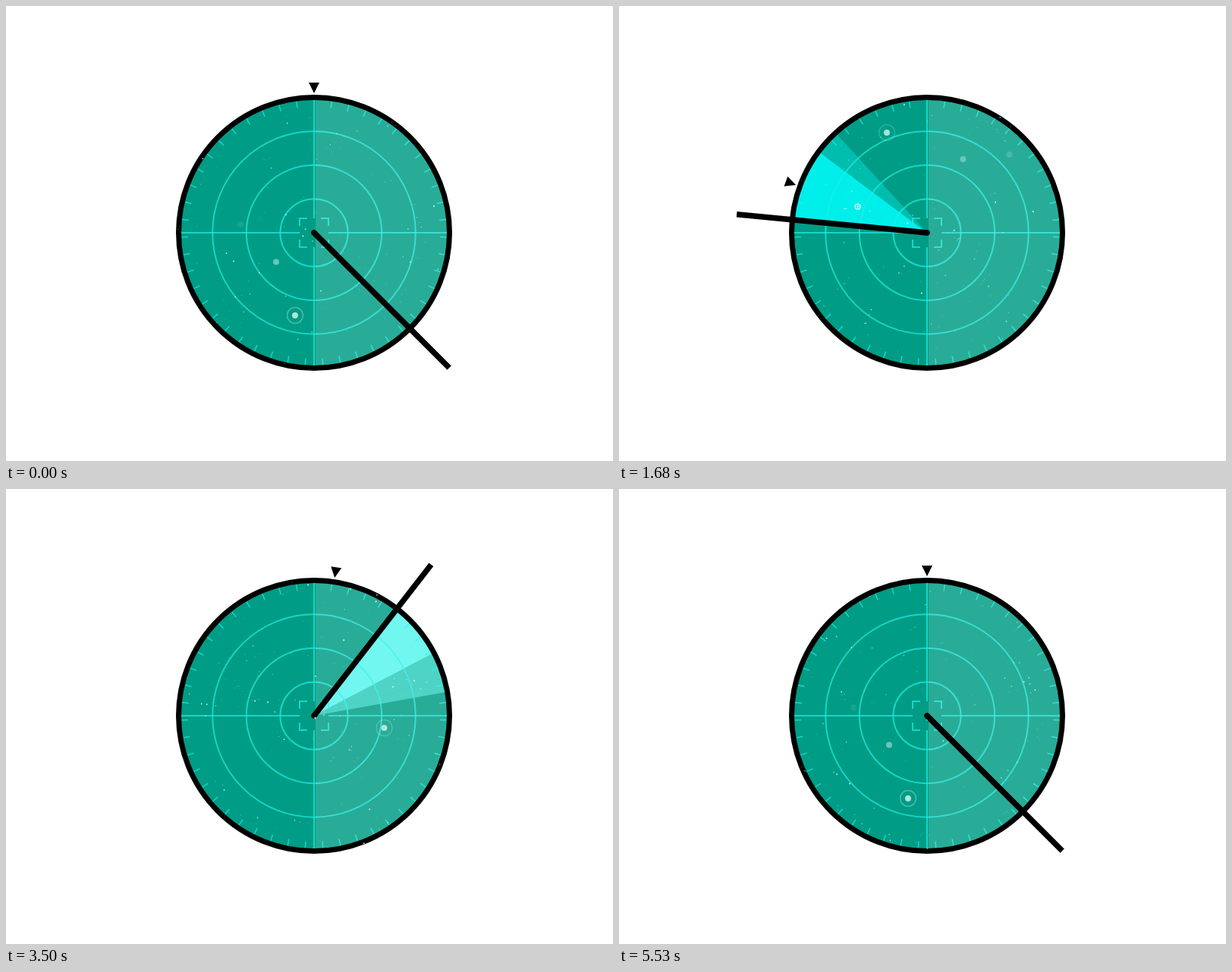
Animation of 800 by 600 pixels, one loop 5600 ms. Source, as an HTML page with a canvas:

```html
<!DOCTYPE html>
<html>
<head>
<meta charset="utf-8">
<style>
  html, body { margin: 0; overflow: hidden; background: #fff; }
  canvas { display: block; }
</style>
</head>
<body>
<canvas width="800" height="600"></canvas>
<script>
const ctx = document.querySelector('canvas').getContext('2d');
const TAU = Math.PI * 2, DEG = Math.PI / 180;
const STEP = 70, STEPS = 80;
const CX = 406, CY = 299;
const GRID = 'rgba(30,240,228,.7)';

// Blip centres relative to the middle of the dial
const blips = [[-53, -132], [-91.5, -34.5], [47.5, -97], [108.5, -103], [92.5, 16],
  [-97, -11], [-71, -18], [-50, 38.5], [-25, 109]];
// Marker keys: step, degrees counter-clockwise from the top
const markerKeys = [[0, 0], [24, 70], [31.7, 70], [61.7, -48.5], [66.5, -48.5], [78.7, 0], [80, 0]];

const clamp = v => Math.max(0, Math.min(1, v));
const smooth = x => x * x * (3 - 2 * x);

function markerAngle(step) {
  const i = markerKeys.findIndex(key => key[0] > step);
  const [t0, a] = markerKeys[i - 1], [t1, b] = markerKeys[i];
  return a + (b - a) * smooth((step - t0) / (t1 - t0));
}

function seeded(seed) {
  return () => {
    seed = seed + 0x6D2B79F5 | 0;
    let t = Math.imul(seed ^ seed >>> 15, 1 | seed);
    t = t + Math.imul(t ^ t >>> 7, 61 | t) ^ t;
    return ((t ^ t >>> 14) >>> 0) / 4294967296;
  };
}

function disc(x, y, r, color) {
  ctx.fillStyle = color;
  ctx.beginPath();
  ctx.arc(x, y, r, 0, TAU);
  ctx.fill();
}

function ring(x, y, r, width, color) {
  ctx.strokeStyle = color;
  ctx.lineWidth = width;
  ctx.beginPath();
  ctx.arc(x, y, r, 0, TAU);
  ctx.stroke();
}

function line(width, color, ...points) {
  ctx.strokeStyle = color;
  ctx.lineWidth = width;
  ctx.beginPath();
  points.forEach(([x, y]) => ctx.lineTo(x, y));
  ctx.stroke();
}

const beam = ctx.createLinearGradient(-200, 0, 204, 0);
beam.addColorStop(0, '#00f5f2');
beam.addColorStop(202 / 404, '#00f5f2');
beam.addColorStop(202 / 404, '#5ffff8');
beam.addColorStop(1, '#5ffff8');

function wedge(from, to, alpha) {
  ctx.globalAlpha = clamp(alpha);
  ctx.fillStyle = beam;
  ctx.beginPath();
  ctx.moveTo(0, 0);
  ctx.arc(0, 0, 178, -from * DEG, -to * DEG);
  ctx.fill();
  ctx.globalAlpha = 1;
}

function drawBeam(hand) {
  const level = clamp((hand + 20) / 80) * clamp((235 - hand) / 65);
  const away = Math.abs(hand - 92);
  const trail = .65 - away * .003;
  const inner = hand - 24.5 - Math.max(0, hand - 152) * .3;
  wedge(hand, inner, level);
  wedge(inner, hand - 36, level * trail);
  wedge(hand - 36, hand - 42, level * (trail - .4 * clamp(1 - away / 40)));
}

function drawGrid() {
  for (const r of [44.6, 89.2, 133.8]) ring(0, 0, r, 2, GRID);
  for (let i = 0; i < 4; i++) {
    ctx.save();
    ctx.rotate(i * TAU / 4);
    line(2, GRID, [19, 0], [176, 0]);
    line(2, GRID, [9, -19], [19, -19], [19, -9]);
    ctx.restore();
  }
  for (let i = 1; i < 47; i++) {
    ctx.save();
    ctx.rotate(i * TAU / 47);
    line(1.5, GRID, [0, -175], [0, -166]);
    ctx.restore();
  }
}

function drawBlip([x, y], hand) {
  const bearing = Math.atan2(-y, x) / DEG;
  const age = (hand - bearing + 720) % 360;
  if (age < 9 || age > 153) return;
  const grow = clamp((age - 9) / 50);
  const echo = clamp((70 - age) / 35);
  const fade = age < 60 ? .95 - .15 * grow : .8 * (153 - age) / 93;
  disc(x, y, 4 * Math.sqrt(grow), `rgba(220,245,240,${fade})`);
  if (echo) ring(x, y, 10.4 * (1 - (1 - grow) ** 3), 1.5, `rgba(225,255,250,${echo * .9})`);
}

function drawSpecks(step) {
  const rand = seeded(step * 977 + 5);
  const count = 90 + 60 * rand();
  let x = 0, y = 0;
  for (let i = 0; i < count; i++) {
    if (rand() < .3) {
      x += (rand() - .5) * 24;
      y += (rand() - .5) * 24;
    } else {
      const r = 181 * Math.sqrt(rand()), a = rand() * TAU;
      x = r * Math.cos(a);
      y = r * Math.sin(a);
    }
    const size = .35 + .8 * rand() ** 4;
    disc(x, y, size, `rgba(255,255,255,${.5 + .5 * rand()})`);
  }
}

function draw(step) {
  const hand = Math.min(720, step * 9.1446) % 360 - 45;
  ctx.fillStyle = '#fff';
  ctx.fillRect(0, 0, 800, 600);
  ctx.save();
  ctx.translate(CX, CY);

  disc(0, 0, 178, '#009c85');
  drawBeam(hand);
  drawGrid();
  ctx.fillStyle = 'rgba(255,255,255,.155)';
  ctx.beginPath();
  ctx.arc(2, 0, 176, -TAU / 4, TAU / 4);
  ctx.fill();
  blips.forEach(blip => drawBlip(blip, hand));
  ring(0, 0, 178.5, 7, '#000');

  ctx.save();
  ctx.rotate(-markerAngle(step) * DEG);
  ctx.fillStyle = '#000';
  ctx.beginPath();
  ctx.moveTo(-7, -198);
  ctx.lineTo(7, -198);
  ctx.lineTo(0, -184);
  ctx.fill();
  ctx.restore();

  ctx.save();
  ctx.rotate(-hand * DEG);
  line(7.5, '#000', [0, 0], [252, 0]);
  disc(0, 0, 3.8, '#000');
  ctx.restore();

  drawSpecks(step);
  ctx.restore();
}

function tick() {
  draw(Math.floor(performance.now() / STEP) % STEPS);
  requestAnimationFrame(tick);
}
tick();
</script>
</body>
</html>
```
